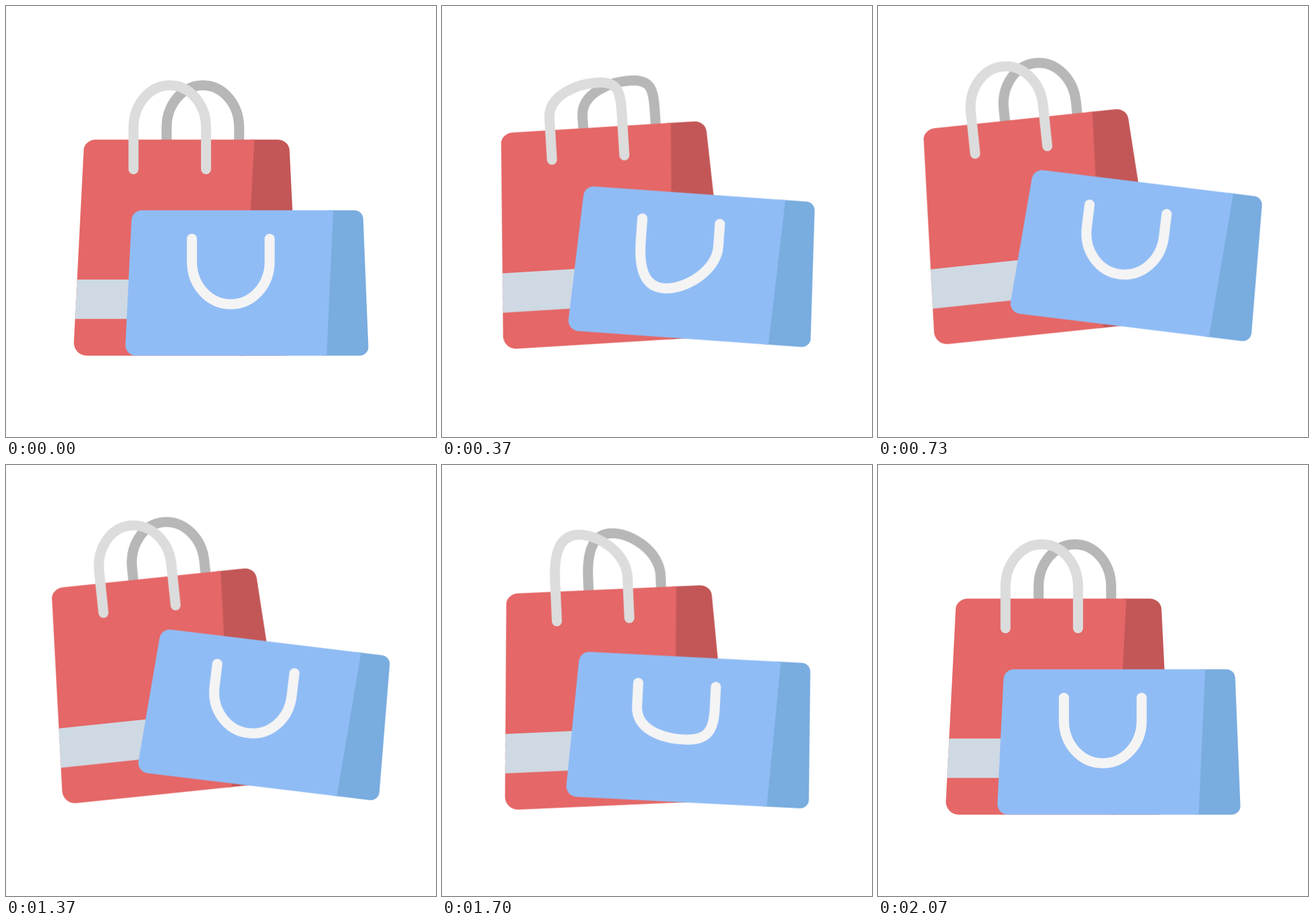
Write an HTML page without scripts that moves like this. It is 747x750 px and loops after 3010 ms.

```html
<!DOCTYPE html>
<html lang="en">
<head>
<meta charset="utf-8">
<title>Shopping bags</title>
<style>
  html, body { margin: 0; width: 100%; height: 100%; overflow: hidden; background: #fff; }
  svg { display: block; width: 100%; height: 100%; }

  .bag, .handle {
    animation: tilt 3.01s infinite;
    animation-timing-function: cubic-bezier(.3333, 0, .6667, 1);
  }

  /* each bag swings out about its own far pivot, holds, and swings home */
  .red { --tilt: -6deg; transform-origin: -62px 773px; }
  .blue { --tilt: 7deg; transform-origin: 831.5px 739px; }
  @keyframes tilt {
    0%, 66.45%, 100% { transform: rotate(0deg); }
    22.15%, 44.3% { transform: rotate(var(--tilt)); }
  }

  /* the crown of a handle lags behind its bag, then settles */
  .handle {
    d: var(--rest);
    fill: none;
    stroke-width: 17.5;
    stroke-linecap: round;
    animation-name: sway;
  }
  @keyframes sway {
    0%, 24.36%, 44.3%, 68.66%, 100% { d: var(--rest); }
    9.97% { d: var(--out); }
    54.27% { d: var(--home); }
  }

  .red {
    --rest: path("M0 72V0C0-41 28-74 63-74S126-41 126 0V72");
    --out: path("M0 72V0C0-41 54-56 89-56S126-41 126 0V72");
    --home: path("M0 72V0C0-41 7-77 42-77S126-41 126 0V72");
  }
  .blue {
    --rest: path("M0-40V0C0 41 30 74 67.5 74S135 41 135 0V-40");
    --out: path("M0-40V0C0 41 7 79 44.5 79S135 41 135 0V-40");
    --home: path("M0-40V0C0 41 47 53 84.5 53S135 41 135 0V-40");
  }
</style>
</head>
<body>
<svg viewBox="0 0 747 750">
  <g class="bag red">
    <path class="handle" stroke="#b7b7b7" transform="translate(279 212)"/>
    <path fill="#c35757" d="M425 232.5H471C483 232.5 492 240 492.5 251L509 584C510 597 500 608.5 486 608.5H405Z"/>
    <path fill="#e56767" d="M157 232.5H431.5L411.5 608.5H141C127 608.5 117 597 118 584L135 251C135.5 240 145 232.5 157 232.5Z"/>
    <path fill="#cfd9e3" d="M123.5 476H400V544.5H120Z"/>
    <path class="handle" stroke="#dcdcdc" transform="translate(221.5 212)"/>
  </g>
  <g class="bag blue">
    <path fill="#79acdf" d="M560 355.5H605C614 355.5 620 362 620.5 370L629.5 593C630 601 623 608.5 614 608.5H550Z"/>
    <path fill="#90bcf5" d="M236.5 355.5H568.5L557 608.5H226C215 608.5 207 599.5 207.5 589L218 373C218.5 363 226 355.5 236.5 355.5Z"/>
    <path class="handle" stroke="#f4f4f4" transform="translate(323 445)"/>
  </g>
</svg>
</body>
</html>
```
